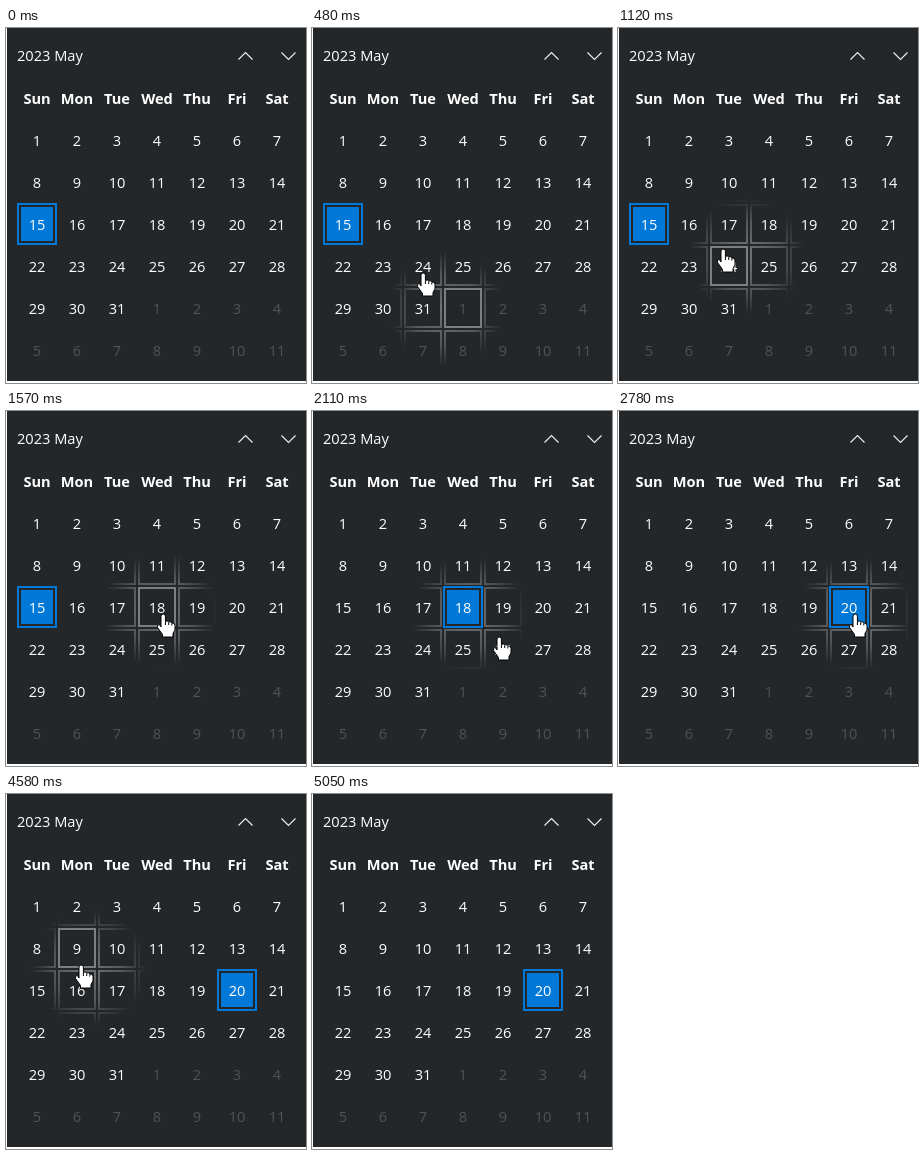
These frames come from a looping animation (300x355 px, 5480 ms). An HTML page with a canvas:

```html
<!DOCTYPE html>
<html lang="en">
<head>
<meta charset="utf-8">
<title>Calendar</title>
<style>
html, body { margin: 0; height: 100%; overflow: hidden; background: #24272a; }
canvas { display: block; }
</style>
</head>
<body>
<canvas id="stage" width="300" height="355"></canvas>
<script>
const ctx = document.getElementById('stage').getContext('2d');
const LOOP = 5480, STEP = 71.5;
const BG = '#24272a', BLUE = '#0078d7', FONT = '14.6px "Open Sans", "Noto Sans", sans-serif';
const LEFT = 11, TOP = 91, CELL_W = 40, CELL_H = 42, GLOW = 58;
const WEEK = ['Sun', 'Mon', 'Tue', 'Wed', 'Thu', 'Fri', 'Sat'];

// Pointer strokes: smooth curves through a few keys, sampled once per step.
const strokes = [
  { start: 260, steps: 18, keys: [[214, 342], [111, 245], [210, 148], [195, 228], [105, 221], [141, 193], [157, 203]] },
  { start: 2110, steps: 7, keys: [[187, 226], [222, 222], [237, 203]] },
  { start: 3110, steps: 2, keys: [[252, 235], [291, 323]], leaves: true },
  { start: 4100, steps: 12, keys: [[255, 341], [132, 205], [75, 171], [135, 200], [228, 310]], leaves: true }
];

const hand = new Path2D('M-2 13V2.2Q-2 0 .2 0T2.4 2.2V7.5Q4.8 6.3 5.7 8Q8 7 8.8 9' +
  'Q12 8.5 12 11.5V16L10 19.5V23H-.5V20.5L-5.5 13.5Q-6 10.5 -4 10.6Q-2.6 11 -2 13Z');
const knuckles = new Path2D('M2.4 8V11M5.7 8.5V11M8.8 9.3V11.5');
const chevrons = new Path2D('M232.5 31.5L239.5 24.5L246.5 31.5M275.5 24.5L282.5 31.5L289.5 24.5');

function spline(keys, u) {
  const i = Math.min(Math.floor(u), keys.length - 2), f = u - i;
  const key = n => keys[Math.max(0, Math.min(n, keys.length - 1))];
  return [0, 1].map(axis => {
    const [a, b, c, d] = [-1, 0, 1, 2].map(n => key(i + n)[axis]);
    return b + f / 2 * (c - a + f * (2 * a - 5 * b + 4 * c - d + f * (3 * (b - c) + d - a)));
  });
}

function position({ steps, keys, leaves }, step) {
  if (step > steps && leaves) return null;
  return spline(keys, Math.min(step / steps, 1) * (keys.length - 1));
}

function pointerAt(t) {
  const index = strokes.findLastIndex(stroke => t >= stroke.start);
  if (index < 0) return {};
  const step = Math.floor((t - strokes[index].start) / STEP);
  const tip = position(strokes[index], step);
  if (!tip) return {};
  // The glow trails the pointer by one step.
  if (step > 0) return { tip, light: position(strokes[index], step - 1) };
  return { tip, light: index > 0 && position(strokes[index - 1], Infinity) };
}

function text(label, x, y, color = '#fff', weight = 500) {
  ctx.font = weight + ' ' + FONT;
  ctx.fillStyle = color;
  ctx.fillText(label, x, y);
}

function outline(x, y, inset, style) {
  ctx.strokeStyle = style;
  ctx.lineWidth = 2;
  ctx.strokeRect(x + inset, y + inset, CELL_W - 2 * inset, CELL_H - 2 * inset);
}

function glowAt([x, y]) {
  const glow = ctx.createRadialGradient(x, y, 0, x, y, GLOW);
  glow.addColorStop(0, 'rgba(255,255,255,.36)');
  glow.addColorStop(0.6, 'rgba(255,255,255,.22)');
  glow.addColorStop(1, 'rgba(255,255,255,0)');
  return glow;
}

function drawCell(i, selected, pressed, light, glow) {
  const x = LEFT + i % 7 * CELL_W, y = TOP + Math.floor(i / 7) * CELL_H;
  if (i + 1 === selected) {
    outline(x, y, 1, BLUE);
    ctx.fillStyle = BLUE;
    ctx.fillRect(x + 4, y + 4, CELL_W - 8, CELL_H - 8);
  } else if (light) {
    const hovered = light[0] >= x && light[0] < x + CELL_W && light[1] >= y && light[1] < y + CELL_H;
    outline(x, y, 2, hovered ? (pressed ? '#a5a6a8' : '#7c7e80') : glow);
  }
  text(i % 31 + 1, x + CELL_W / 2, y + 27, i < 31 ? '#fff' : '#505356');
}

function drawHand([x, y]) {
  ctx.save();
  ctx.translate(x, y);
  ctx.fillStyle = '#fff';
  ctx.strokeStyle = '#000';
  ctx.lineWidth = 1;
  ctx.fill(hand);
  ctx.stroke(hand);
  ctx.stroke(knuckles);
  ctx.restore();
}

function draw(t) {
  const { tip, light } = pointerAt(t);
  const selected = t < 1780 ? 15 : t < 2780 ? 18 : 20;
  const pressed = (t >= 1720 && t < 1780) || (t >= 2720 && t < 2780);

  ctx.fillStyle = '#fff';
  ctx.fillRect(0, 0, 300, 355);
  ctx.fillStyle = BG;
  ctx.fillRect(1, 0, 299, 353);

  ctx.textAlign = 'left';
  text('2023 May', 11, 33);
  ctx.strokeStyle = '#f0f0f0';
  ctx.lineWidth = 1.1;
  ctx.stroke(chevrons);

  ctx.textAlign = 'center';
  WEEK.forEach((day, i) => text(day, 31 + i * CELL_W, 76, '#fff', 700));

  const glow = light && glowAt(light);
  for (let i = 0; i < 42; i++) drawCell(i, selected, pressed, light, glow);
  if (tip) drawHand(tip);
}

const begin = performance.now();
function tick() {
  draw((performance.now() - begin) % LOOP);
  requestAnimationFrame(tick);
}
tick();
</script>
</body>
</html>
```
